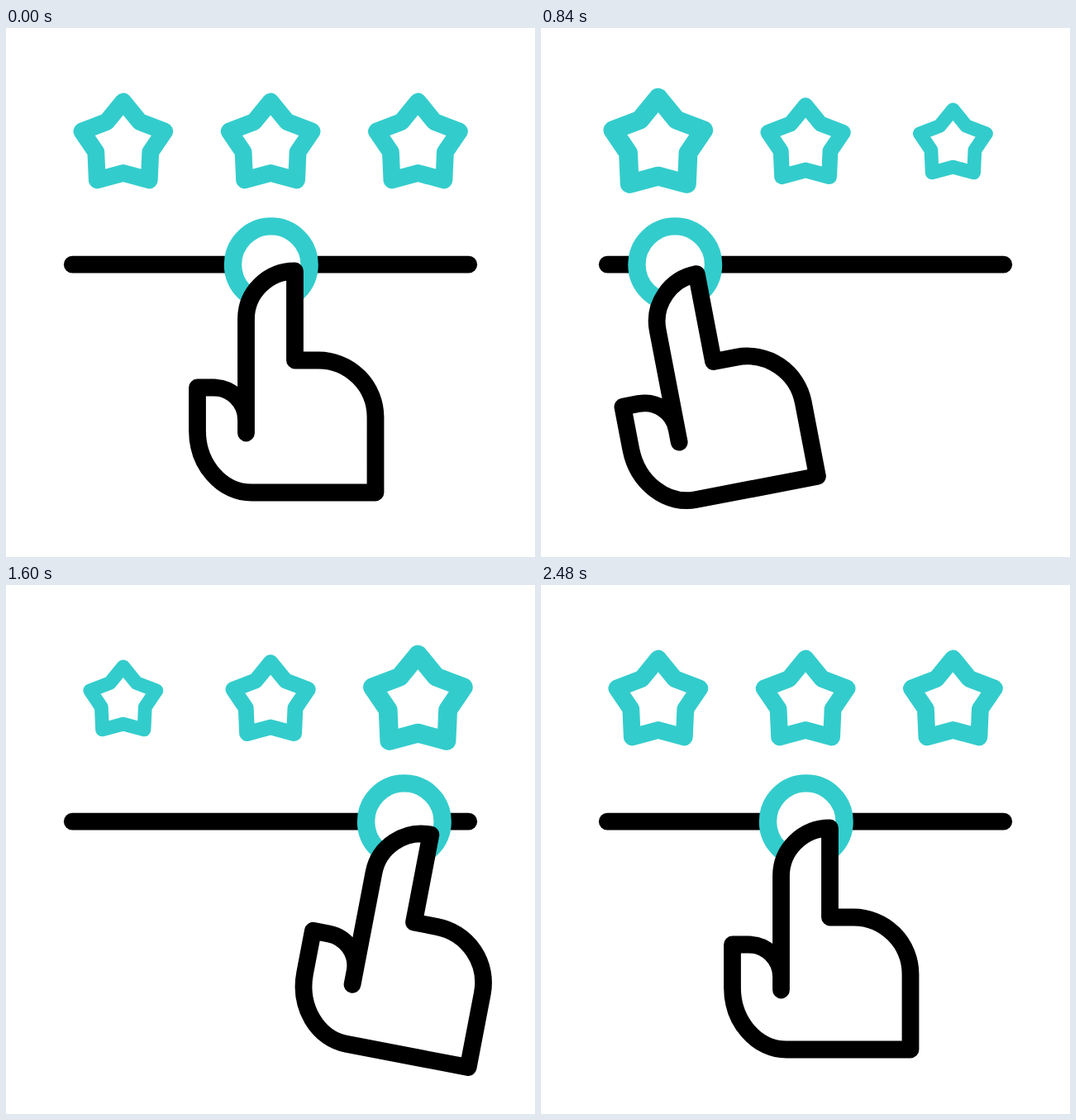
These frames come from a looping animation (640x640 px, 3 s). An HTML page:

```html
<!DOCTYPE html>
<html lang="en">
<head>
<meta charset="utf-8">
<title>Rating slider</title>
<style>
  html, body { margin: 0; width: 100%; height: 100%; overflow: hidden; background: #fff; }
  svg { display: block; width: 100%; height: 100%; }
  .ink, .accent { fill: #fff; stroke-width: 20.8; stroke-linecap: round; stroke-linejoin: round; }
  .ink { stroke: #000; }
  .accent { stroke: #33cccc; }
</style>
</head>
<body>
<svg viewBox="0 0 640 640">
  <defs>
    <path id="star" d="M0-49.5 20-25 50-13.5 33 11.5 31.5 45.5 0 37 -31.5 45.5 -33 11.5 -50-13.5 -20-25Z"/>
  </defs>
  <g class="accent" id="stars">
    <use href="#star"/>
    <use href="#star"/>
    <use href="#star"/>
  </g>
  <path class="ink" d="M80.3 286.2H559.7"/>
  <circle class="accent" id="knob" cy="286.2" r="46.3" style="stroke-width:21.4"/>
  <path class="ink" id="hand" d="M290.5 490V352A59 58 0 0 1 349.5 294V402H378A69 69 0 0 1 447 471V562H297A65.5 75 0 0 1 231.5 487V435H251A39.5 39 0 0 1 290.5 474"/>
</svg>
<script>
  const LOOP = 3000, STEP = 40;
  const PIVOT = { x: 366.5, y: 310 };
  const stars = document.querySelectorAll('#stars use');
  const knob = document.getElementById('knob');
  const hand = document.getElementById('hand');

  // Keys are [time, value] pairs, eased in and out between neighbours.
  function track(keys, t) {
    if (t <= keys[0][0]) return keys[0][1];
    for (let i = 1; i < keys.length; i++) {
      const [t0, a] = keys[i - 1], [t1, b] = keys[i];
      if (t < t1) {
        const p = (t - t0) / (t1 - t0);
        return a + (b - a) * p * p * (3 - 2 * p);
      }
    }
    return keys[keys.length - 1][1];
  }

  // Rest, swing left, pause, swing right, return.
  const swing = (rest, left, right) =>
    [[160, rest], [640, left], [800, left], [1640, right], [2480, rest]];

  const slide = swing(0, -160.7, 163.2);
  const tilt = swing(0, -11, 11);
  const drop = swing(0, 0, 11);
  const sizes = [
    swing(1, 1.1, 0.8),
    [[160, 1], [640, 0.9], [800, 0.9], [1200, 1.1], [1640, 0.9], [2480, 1]],
    swing(1, 0.8, 1.1)
  ];

  function draw(t) {
    const x = track(slide, t);
    knob.setAttribute('cx', 320.8 + x);
    hand.setAttribute('transform',
      `translate(${x} ${track(drop, t)}) rotate(${track(tilt, t)} ${PIVOT.x} ${PIVOT.y})`);
    stars.forEach((star, i) => star.setAttribute('transform',
      `translate(${141.8 + 178.3 * i} 138.5) scale(${track(sizes[i], t)})`));
  }

  const start = performance.now();
  function tick() {
    const t = (performance.now() - start) % LOOP;
    draw(Math.floor(t / STEP) * STEP);
    requestAnimationFrame(tick);
  }
  draw(0);
  requestAnimationFrame(tick);
</script>
</body>
</html>
```
